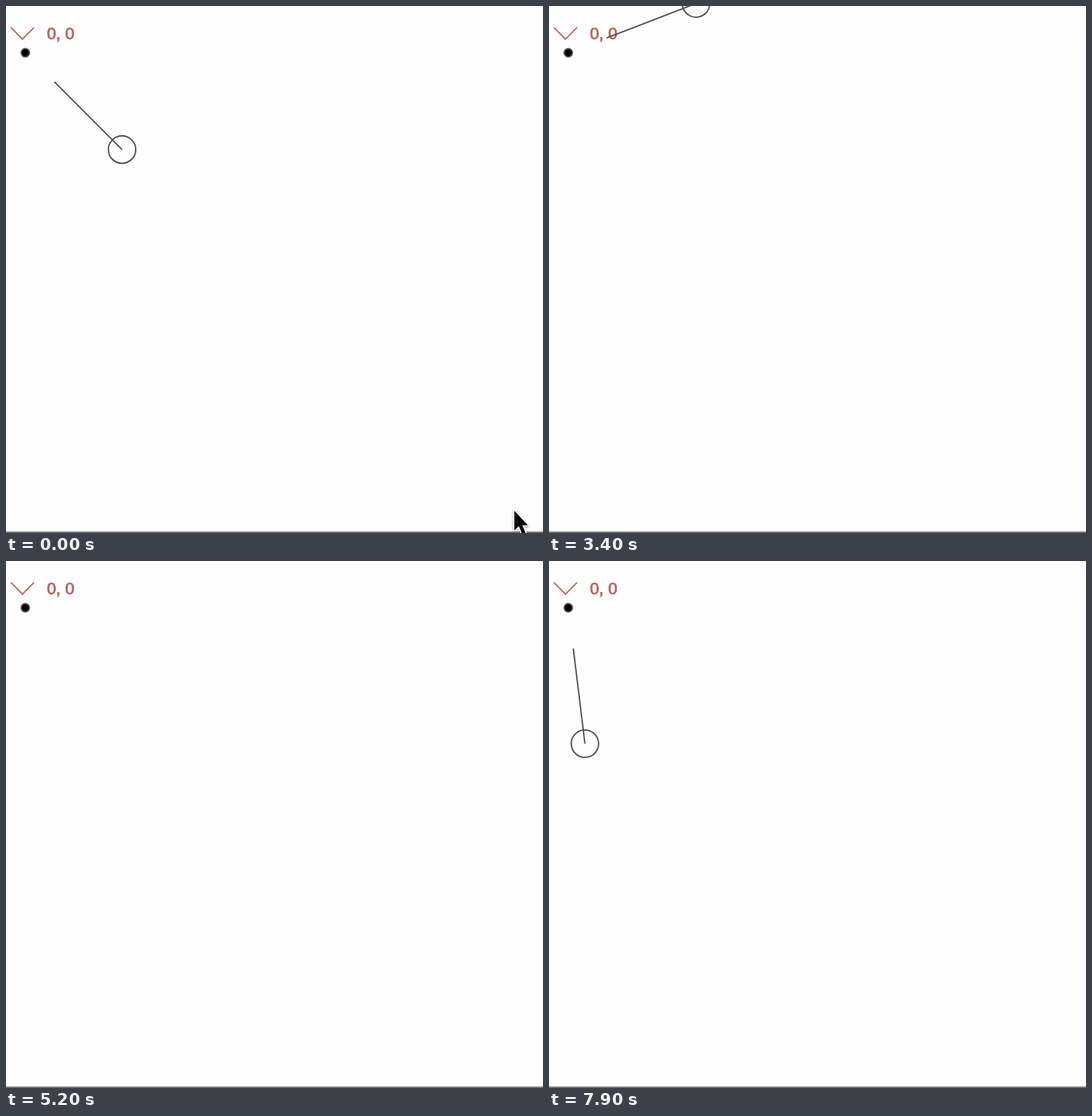
Recreate the animation shown at these times as an HTML page. Size 712 px wide and 698 px high, loop 8000 ms.

```html
<!DOCTYPE html>
<html lang="en">
<head>
<meta charset="utf-8">
<title>Pendulum rotating about the origin</title>
<style>
  html, body { margin: 0; width: 100%; height: 100%; overflow: hidden; background: #fefefe; }
  svg { display: block; }
  .label { font: 21.8px "Liberation Sans", Arial, sans-serif; fill: #b96666; stroke: #b96666; stroke-width: .9; }
  .chevron { fill: none; stroke: #b96666; stroke-width: 1.8; }
  .arm { fill: none; stroke: #505050; stroke-width: 1; }
  .cursor { stroke: #fff; stroke-width: 3; stroke-linejoin: round; paint-order: stroke;
            filter: drop-shadow(0 1px 1.5px rgba(0, 0, 0, .35)); }
</style>
</head>
<body>
<svg width="712" height="698" viewBox="0 0 712 698">
  <rect y="696" width="712" height="2" fill="#7c7c7c"/>
  <path class="chevron" d="M6.5 28.3L21.8 44L37.2 28.3"/>
  <text class="label" x="54.2" y="43.9">0, 0</text>
  <g transform="translate(25.6 61.9) scale(1.814)">
    <g id="arm" class="arm">
      <circle r="3" fill="#000"/>
      <path d="M30 0H100"/>
      <circle cx="100" r="10"/>
    </g>
  </g>
  <path id="cursor" class="cursor" d="M674 668.5V694.5L680 689L685 700.5L689.3 698.7L684.5 687.7H692Z"/>
</svg>
<script>
  const LOOP = 8000, STEP = 100;
  const START = Math.PI / 4, TURN = 0.18, DELAY = 5.5;   // radians, radians per step, steps
  const CURSOR_END = 1000;
  const arm = document.getElementById('arm');
  const cursor = document.getElementById('cursor');

  function draw(now) {
    const t = now % LOOP;
    const step = Math.floor(t / STEP);
    const angle = START + TURN * Math.max(0, step - DELAY);
    arm.setAttribute('transform', `rotate(${angle * 180 / Math.PI})`);
    cursor.style.display = t < CURSOR_END ? '' : 'none';
  }

  let origin;
  function tick(now) {
    origin ??= now;
    draw(now - origin);
    requestAnimationFrame(tick);
  }
  draw(0);
  requestAnimationFrame(tick);
</script>
</body>
</html>
```
